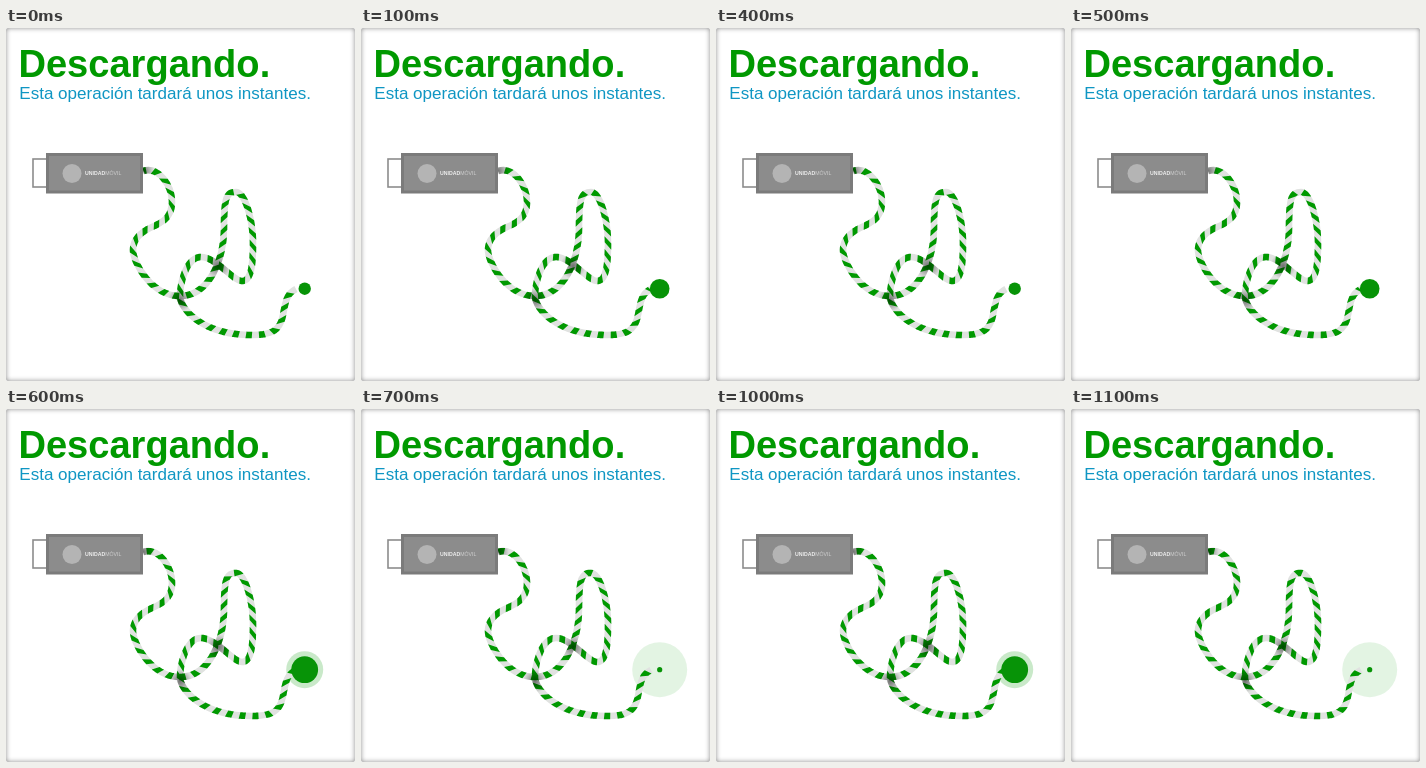
An HTML page with a canvas that plays this animation: 349x353 px, repeating every 1.2 s.

```html
<!DOCTYPE html>
<html lang="es">
<head>
<meta charset="utf-8">
<title>Descargando</title>
<style>
html, body { margin: 0; width: 100%; height: 100%; overflow: hidden; background: #fff; }
#stage { position: relative; width: 349px; height: 353px; overflow: hidden; background: #fff; }
#card { position: absolute; inset: 0; border-radius: 2px; box-shadow: inset 0 0 5px #8c8c8c; }
svg, canvas { position: absolute; left: 0; top: 0; width: 349px; height: 353px; }
text { font-family: Arial, "Liberation Sans", sans-serif; }
</style>
</head>
<body>
<div id="stage">
  <div id="card"></div>
  <canvas id="scene"></canvas>
  <svg viewBox="0 0 349 353">
    <path id="route" fill="none" d="M137 143 C153 138 166 158 166 174 S155 195 146 199 S127 210 127 222
      S145 268 174 268 S218 232 218 200 S221 164 230 164 S247 192 247 215 S245 253 236 253
      S210 229 195 229 S174 256 174 268 S195 307 246 307 C265 307 274 303 277 287 S281 266 290 261"/>
    <text x="12.4" y="49" font-size="38.1" font-weight="bold" fill="#009900">Descargando.</text>
    <text x="13.3" y="71" font-size="17.05" fill="#0f96c3">Esta operación tardará unos instantes.</text>
    <rect x="27" y="131" width="14" height="28" fill="#fff" stroke="#8c8c8c" stroke-width="1.6"/>
    <rect x="41.5" y="126.5" width="94" height="37.5" fill="#8c8c8c" stroke="#7b7b7b" stroke-width="3"/>
    <circle cx="66" cy="145.5" r="9.5" fill="#b4b4b4"/>
    <text x="79" y="147" font-size="5.2" fill="#d0d0d0"><tspan font-weight="bold" fill="#eee">UNIDAD</tspan>MÓVIL</text>
  </svg>
</div>
<script>
const W = 349, H = 353;
const STEP = 100, STEPS = 12, PULSE = 4;
const PERIOD = 13, HALF = 3.3, TWIST = 3.5;

const route = document.getElementById('route');
const rope = new Path2D(route.getAttribute('d'));
const length = route.getTotalLength();
const canvas = document.getElementById('scene');
const ctx = canvas.getContext('2d');
const ratio = window.devicePixelRatio || 1;
canvas.width = W * ratio;
canvas.height = H * ratio;
ctx.scale(ratio, ratio);

// Point on one side of the rope; the twist slants the stripes where it runs steeply.
function edge(s, side) {
  const a = route.getPointAtLength(s - 0.5), b = route.getPointAtLength(s + 0.5);
  const angle = Math.atan2(b.y - a.y, b.x - a.x);
  const p = route.getPointAtLength(s - side * TWIST * Math.sin(angle));
  return [p.x - Math.sin(angle) * side * HALF, p.y + Math.cos(angle) * side * HALF];
}

function stripe(from, to) {
  const path = new Path2D();
  for (let s = from; s <= to; s++) path.lineTo(...edge(s, 1));
  for (let s = to; s >= from; s--) path.lineTo(...edge(s, -1));
  return path;
}

// The stripes take one of four positions, so each set is built once.
const stripeSets = Array.from({ length: PULSE }, (_, phase) => {
  const set = new Path2D();
  for (let end = length + PERIOD * (0.5 - phase / PULSE); end > 0; end -= PERIOD) {
    set.addPath(stripe(Math.max(0, end - PERIOD / 2), Math.min(length, end)));
  }
  return set;
});

function strokeRope(style) {
  ctx.lineWidth = HALF * 2;
  ctx.strokeStyle = style;
  ctx.stroke(rope);
}

function shade(x, y, r) {
  const glow = ctx.createRadialGradient(x, y, 0, x, y, r);
  glow.addColorStop(0, 'rgba(0,0,0,0.5)');
  glow.addColorStop(1, 'rgba(0,0,0,0)');
  strokeRope(glow);
}

function disc(r, color) {
  ctx.beginPath();
  ctx.arc(298.7, 260.7, r, 0, Math.PI * 2);
  ctx.fillStyle = color;
  ctx.fill();
}

function draw(now) {
  const step = Math.floor(now / STEP) % STEPS;
  const phase = step % PULSE;
  ctx.clearRect(0, 0, W, H);

  // The halo appears with the full dot and spreads once more, except after the first pulse.
  const spread = phase - 2;
  if (spread === 0 || (spread === 1 && step >= PULSE)) {
    disc(18.5 + 9 * spread, `rgba(0,153,0,${0.21 - 0.1 * spread})`);
  }

  strokeRope('#e0e2e0');
  ctx.fillStyle = '#009900';
  ctx.fill(stripeSets[phase]);
  shade(137, 143, 11);
  shade(174, 272, 12);
  shade(212, 238, 13);

  const growth = (phase + 1) % PULSE;
  disc(2.6 + 3.6 * growth, '#079307');
}

const start = performance.now();
function tick() {
  draw(performance.now() - start);
  requestAnimationFrame(tick);
}
tick();
</script>
</body>
</html>
```
